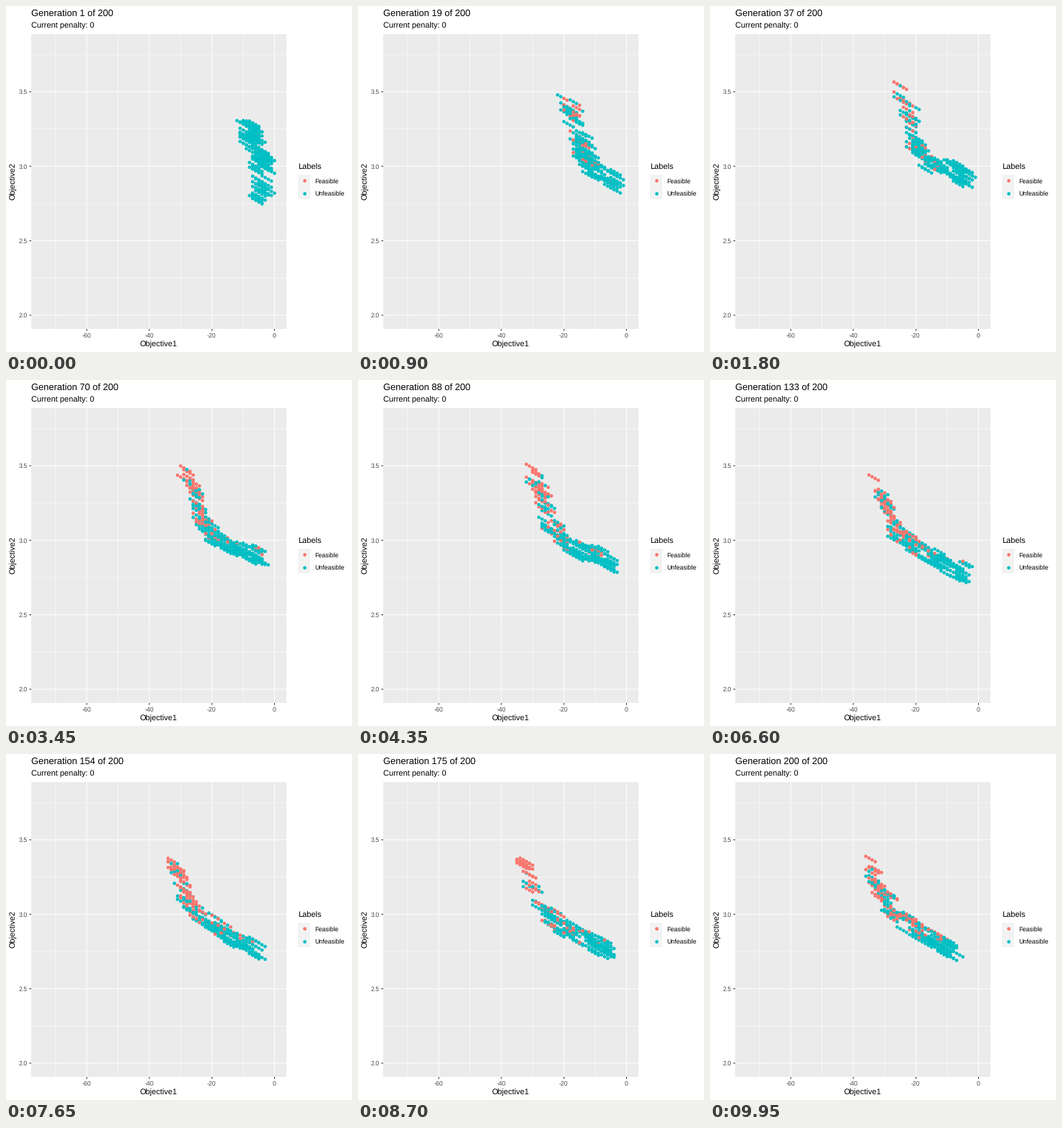
Write a matplotlib script that moves like this. It is 480 px wide and 480 px high and loops after 10000 ms.

```python
import numpy as np
import matplotlib.pyplot as plt
from matplotlib.animation import FuncAnimation
from matplotlib.patches import Rectangle

SIZE = 480
GENERATIONS = 200
FAMILIES, SIBLINGS = 96, 4
LIFE = 8  # generations before a family is replaced
DOT = 4.7
FEASIBLE, UNFEASIBLE = "#F8766D", "#00BFC4"
LEFT, TOP, RIGHT, BOTTOM = 35, 39, 389, 448

# Middle line of the cloud, from its upper to its lower end, at four generations.
STAGES = (1, 37, 106, 200)
SPINES = np.array([
    [(-8, 3.24), (-5.5, 3.15), (-4, 3.04), (-4, 3.0), (-4, 2.9), (-4, 2.81)],
    [(-27, 3.54), (-23, 3.37), (-22, 3.19), (-19, 3.05), (-12, 3.0), (-3, 2.94)],
    [(-32, 3.43), (-29, 3.3), (-26, 3.07), (-20, 2.97), (-12, 2.87), (-4, 2.79)],
    [(-35, 3.36), (-32, 3.18), (-27, 3.0), (-20, 2.89), (-13, 2.81), (-6, 2.74)],
])

plt.rcParams["font.family"] = "Liberation Sans"
plt.rcParams["text.hinting"] = "none"

rng = np.random.default_rng(11)
TABLE = (GENERATIONS // LIFE + 2, FAMILIES)
PLACE = rng.random(TABLE)
SHIFT_X = rng.uniform(-1, 1, TABLE)
SHIFT_Y = rng.uniform(-1, 1, TABLE)
LUCK = rng.random(TABLE + (SIBLINGS,))
PHASE = rng.integers(0, LIFE, FAMILIES)
SIBLING = np.arange(SIBLINGS) - (SIBLINGS - 1) / 2
COLORS = np.array([UNFEASIBLE, FEASIBLE])


def px(x):
    return 372.5 + 4.341 * x


def py(y):
    return 222.3 - 206.7 * (y - 3)


def spine(stage, s):
    """Blend the middle lines over time (stage) and along their length (s)."""
    stages, knots, _ = SPINES.shape
    along = s * (knots - 1)
    i = np.minimum(stage.astype(int), stages - 2)
    j = np.minimum(along.astype(int), knots - 2)
    a, b = (stage - i)[:, None], (along - j)[:, None]
    before = SPINES[i, j] * (1 - b) + SPINES[i, j + 1] * b
    after = SPINES[i + 1, j] * (1 - b) + SPINES[i + 1, j + 1] * b
    return (before * (1 - a) + after * a).T


def population(gen):
    life = (gen + PHASE) // LIFE
    born = np.maximum(life * LIFE - PHASE, 1)
    pick = life, np.arange(FAMILIES)

    stage = np.interp(born, STAGES, range(len(STAGES)))
    stage = np.where(stage < 1, stage ** 0.6, stage)  # fast start
    early = 1 - np.minimum(stage, 1)

    # Three clumps at first, later a continuous front that is denser at its lower end.
    s = PLACE[pick] ** (0.7 + 0.5 * early)
    s -= 0.9 * early * np.sin(4 * np.pi * s) / (4 * np.pi)
    x, y = spine(stage, s)
    edge = SHIFT_Y[pick]
    x = x + SHIFT_X[pick] * (1 + 1.5 * early)
    y = y + 0.06 * edge

    # Siblings sit side by side on a slight downward slope.
    x = np.minimum(np.round(x[:, None] + SIBLING), 0)
    y = y[:, None] - 0.012 * SIBLING
    growth = np.sqrt(np.minimum((born - 1) / 100, 1))
    chance = growth * (0.95 * (1 - s) ** 1.5 + 0.15 * edge)
    feasible = LUCK[pick] < chance[:, None]
    return np.column_stack([px(x).ravel(), py(y).ravel()]), COLORS[feasible.astype(int).ravel()]


fig = plt.figure(figsize=(SIZE / 72, SIZE / 72), dpi=72, facecolor="white")
ax = fig.add_axes([0, 0, 1, 1])
ax.set(xlim=(0, SIZE), ylim=(SIZE, 0))
ax.axis("off")


def box(x, y, w, h, color):
    ax.add_patch(Rectangle((x, y), w, h, facecolor=color, linewidth=0, zorder=0))


def line(xs, ys, color="white", width=1.07):
    ax.plot(xs, ys, color=color, lw=width, zorder=1, solid_capstyle="butt", snap=False)


def label(x, y, text, size, color="black", ha="left", **kw):
    return ax.text(x, y, text, fontsize=size, color=color, ha=ha, va="baseline", **kw)


def scatter(places, colors, zorder):
    x, y = np.transpose(places)
    return ax.scatter(x, y, s=DOT ** 2, c=colors, linewidths=0, zorder=zorder)


box(LEFT, TOP, RIGHT - LEFT, BOTTOM - TOP, "#EBEBEB")
for x in range(-70, 0, 20):
    line([px(x)] * 2, [TOP, BOTTOM], width=0.53)
for y in np.arange(2.25, 4, 0.5):
    line([LEFT, RIGHT], [py(y)] * 2, width=0.53)
for x in range(-60, 1, 20):
    line([px(x)] * 2, [TOP, BOTTOM])
    line([px(x)] * 2, [BOTTOM, BOTTOM + 2.7], "#333333")
    label(px(x) - 0.4, 460, str(x), 8.8, "#4D4D4D", "center")
for y in np.arange(2, 4, 0.5):
    line([LEFT, RIGHT], [py(y)] * 2)
    line([LEFT - 2.7, LEFT], [py(y)] * 2, "#333333")
    label(30, py(y) + 3.2, f"{y:.1f}", 8.8, "#4D4D4D", "right")

label(211.7, 473, "Objective1", 11, ha="center")
label(13, 243, "Objective2", 11, ha="center", rotation=90, rotation_mode="anchor")

label(405, 227, "Labels", 11)
for y, name, color in ((242.4, "Feasible", FEASIBLE), (259.6, "Unfeasible", UNFEASIBLE)):
    box(405, y - 8.64, 17.28, 17.28, "#F2F2F2")
    scatter([(413.6, y)], [color], 3)
    label(428, y + 3.3, name, 8.8)

title = label(35, 14, "", 12.9)
label(35, 31, "Current penalty: 0", 11)
dots = scatter(*population(1), 2)


def draw(frame):
    gen = frame + 1
    title.set_text(f"Generation {gen} of {GENERATIONS}")
    places, colors = population(gen)
    dots.set_offsets(places)
    dots.set_facecolors(colors)
    return title, dots


anim = FuncAnimation(fig, draw, frames=GENERATIONS, interval=50, repeat=True, repeat_delay=0)
plt.show()
```
